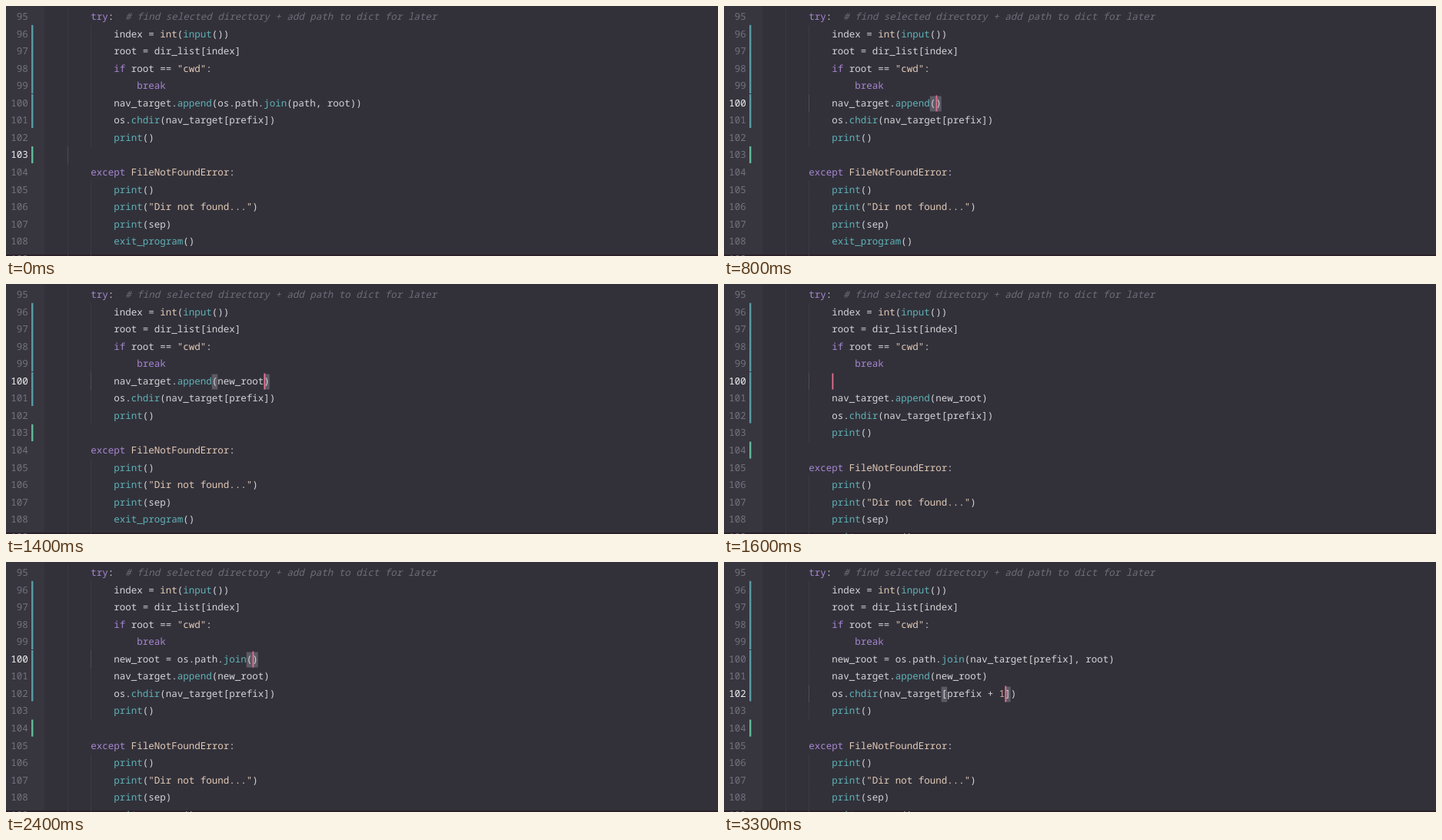
Write an HTML page that moves like this. It is 926 by 326 pixels and loops after 3400 ms.

```html
<!DOCTYPE html>
<html lang="en">
<head>
<meta charset="utf-8">
<title>Code editor</title>
<style>
  html, body { margin: 0; width: 100%; height: 100%; overflow: hidden; background: #32313a; }
  svg { display: block; width: 926px; height: 326px; }
  text {
    font: 12.5px "Noto Sans Mono", "DejaVu Sans Mono", monospace;
    text-rendering: geometricPrecision;
    white-space: pre;
    fill: #d6d4d8;
  }
  .num { fill: #73727e; text-anchor: end; }
  .num.on { fill: #f0eff2; font-weight: 500; }
  .comment { fill: #6e6d79; font-style: italic; }
  .string, .type { fill: #e3cab6; }
  .digit { fill: #dfa592; }
  .key { fill: #a886d2; }
  .call { fill: #5fb2b7; }
  .guide { fill: #3b3a44; }
  .guide.on { fill: #4e4d58; }
  .match { fill: #5b5a65; }
  .caret { fill: #e2708f; }
  .changed { fill: #579ba6; }
  .added { fill: #62b999; }
</style>
</head>
<body>
<svg viewBox="0 0 926 326">
  <rect width="926" height="326" fill="#32313a"/>
  <rect width="50" height="326" fill="#37363f"/>
  <rect y="324" width="926" height="2" fill="#2b2029"/>
  <g id="view"></g>
</svg>
<script>
const LEFT = 110.2, CHAR = 7.5, ROW = 22.52, TOP = 2.9, FIRST = 95, STEP = 100;
const PAD = '    ';

const source = [
  'try:  # find selected directory + add path to dict for later',
  '    index = int(input())',
  '    root = dir_list[index]',
  '    if root == "cwd":',
  '        break',
  '    nav_target.append(os.path.join(path, root))',
  '    os.chdir(nav_target[prefix])',
  '    print()',
  '',
  'except FileNotFoundError:',
  '    print()',
  '    print("Dir not found...")',
  '    print(sep)',
  '    exit_program()',
  ''
];

const append = s => `nav_target.append(${s})`;
const join = s => append(`os.path.join(${s}, root)`);
const chdir = s => `os.chdir(nav_target[${s}])`;
const edit = (row, text, alpha = 1) => ({ row, text: PAD + text, alpha });

// One edit per step; "|" marks the caret.
const steps = [
  { row: 8, text: '', alpha: 0 },
  ...['path|', '|', 'nav_t|', 'nav_target[pre|]'].map(s => edit(5, join(s))),
  edit(5, join('nav_target[prefix]|'), .7),
  edit(5, join('nav_target[prefix]|'), .35),
  ...['|', '|', 'n|', 'ne|', 'new|', 'new_|', 'new_ro|', 'new_root|'].map(s => edit(5, append(s))),
  edit(4, '    break|'),
  { ...edit(5, '|'), insert: true },
  ...['n|', 'new|', 'new_ro|', 'new_root|', 'new_root = |', 'new_root = os.|',
      'new_root = os.path.|', 'new_root = os.path.join(|)',
      'new_root = os.path.join(nav_target[prefix], root|)'].map(s => edit(5, s)),
  ...['prefix|', 'prefix+1|', 'prefix |+1', 'prefix + |1', 'prefix + 1|'].map(s => edit(7, chdir(s))),
  edit(7, chdir('prefix + 1|'), .6),
  edit(7, chdir('prefix + 1|'), .3),
  edit(7, chdir('prefix + 1|'))
];

const kinds = [
  ['comment', /^#/],
  ['string', /^"/],
  ['digit', /^\d/],
  ['key', /^(try|except|if|break)$/],
  ['type', /^(int|FileNotFoundError)$/],
  ['call', /^(input|append|join|chdir|print|exit_program)$/]
];

const colX = col => LEFT + col * CHAR;
const rowY = row => TOP + row * ROW;
const rect = (cls, x, y, w, h, alpha = 1) =>
  `<rect class="${cls}" x="${x}" y="${y}" width="${w}" height="${h}" opacity="${alpha}"/>`;
const label = (cls, x, row, s) =>
  `<text class="${cls}" x="${x}" y="${rowY(row) + 15.4}">${s}</text>`;

function codeLine(line, row) {
  return [...line.matchAll(/#.*|"[^"]*"|\w+|[^\s\w]/g)].map(m => {
    const kind = kinds.find(k => k[1].test(m[0]));
    return label(kind ? kind[0] : '', colX(m.index), row, m[0]);
  }).join('');
}

// Columns of the bracket pair that closes right after the caret.
function bracketPair(line, caret) {
  if (!/[)\]]/.test(line[caret] || ' ')) return [];
  let depth = 0;
  for (let i = caret; i >= 0; i--) {
    if (/[)\]]/.test(line[i])) depth++;
    if (/[(\[]/.test(line[i]) && --depth === 0) return [i, caret];
  }
  return [];
}

function draw(n) {
  const lines = source.slice();
  let extra = 0;
  for (const s of steps.slice(0, n + 1)) {
    if (s.insert) { lines.splice(s.row, 0, ''); extra = 1; }
    lines[s.row] = s.text.replace('|', '');
  }
  const { row: active, text, alpha } = steps[n];
  const caret = text.indexOf('|');
  const blank = 8 + extra;
  let out = '';

  for (let r = 0; r < 15; r++) {
    const y = rowY(r), on = r === active ? ' on' : '';
    out += rect('guide' + (r === blank ? on : ''), 80, y, 1, ROW);
    if (r > 0 && r < blank || r > blank + 1) out += rect('guide' + on, 110, y, 1, ROW);
  }
  out += rect('changed', 33, 24.8, 2.4, 89.2);
  out += rect('changed', 33, 115, 2.4, 44 + extra * ROW);
  out += rect('added', 33, rowY(blank), 2.4, 22);

  for (const c of bracketPair(lines[active], caret))
    out += rect('match', colX(c), rowY(active) + 2, CHAR, 20);
  for (let r = 0; r < 15; r++) {
    out += label('num' + (r === active ? ' on' : ''), 28.8, r, FIRST + r);
    out += codeLine(lines[r], r);
  }
  if (caret >= 0) out += rect('caret', colX(caret) + .3, rowY(active) + 1, 1.8, 21, alpha);
  document.getElementById('view').innerHTML = out;
}

let shown = -1;
const start = performance.now();
function tick() {
  const n = Math.floor((performance.now() - start) / STEP) % steps.length;
  if (n !== shown) draw(shown = n);
  requestAnimationFrame(tick);
}
tick();
</script>
</body>
</html>
```
